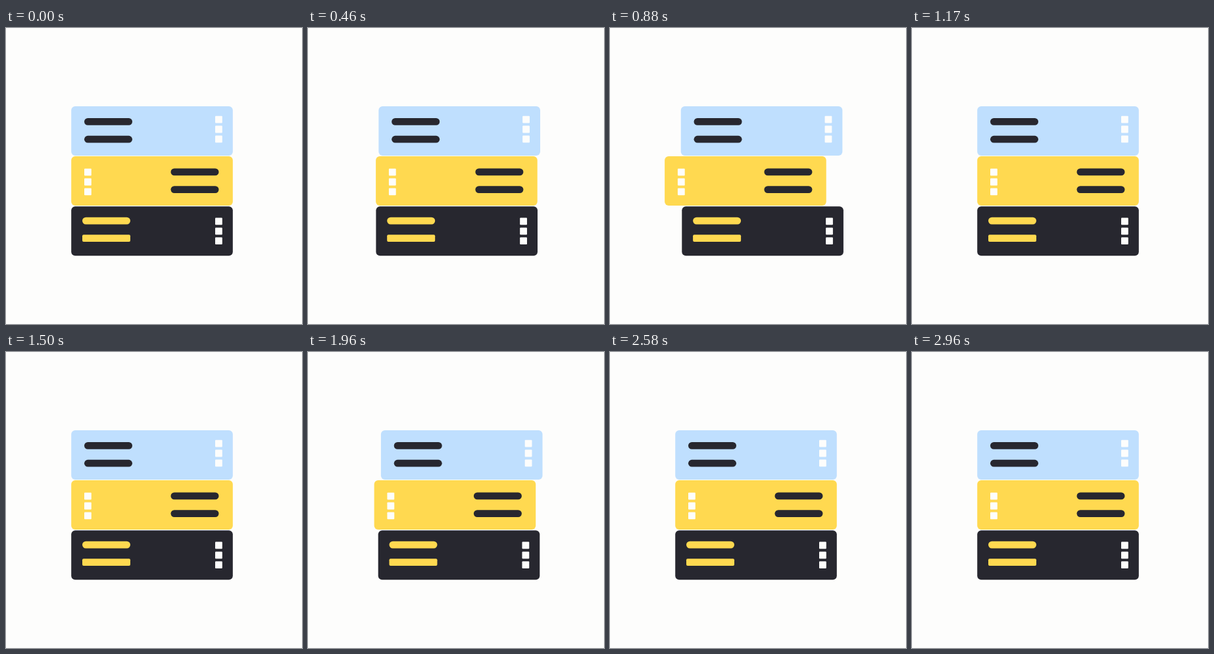
An HTML page that plays this animation: 450x450 px, repeating every 3 s.

```html
<!DOCTYPE html>
<html>
<head>
<meta charset="utf-8">
<style>
  html, body { margin: 0; width: 100%; height: 100%; overflow: hidden; background: #fdfdfc; }
  svg { display: block; width: 100vw; height: 100vh; }
</style>
</head>
<body>
<svg viewBox="0 0 450 450"></svg>
<script>
const LOOP = 3000, FRAME = 1000 / 24, CYCLE_FRAMES = 35;
const BLUE = '#bfdffe', YELLOW = '#ffd950', DARK = '#27272f', WHITE = '#fdfdfc';

// Keys are [time in ms, horizontal offset] within one sway.
const slabs = [
  { y: 119, fill: BLUE, ink: DARK, lineX: 119, lineY: [137, 163.8], dotX: 318, dotY: 133.7,
    keys: [[255, 0], [660, 16.2], [1100, 0]] },
  { y: 195, fill: YELLOW, ink: DARK, lineX: 250.5, lineY: [213.5, 240.2], dotX: 119, dotY: 213.7,
    keys: [[180, 0], [390, 5], [750, -19.5], [1130, 0]] },
  { y: 271.3, fill: DARK, ink: YELLOW, lineX: 116, lineY: [287.7, 314.3], dotX: 318, dotY: 288.5,
    keys: [[300, 0], [700, 15], [1115, 0]] }
];

const rect = (x, y, w, h, r, fill) =>
  `<rect x="${x}" y="${y}" width="${w}" height="${h}" rx="${r}" fill="${fill}"/>`;

const slab = s => '<g>' +
  rect(99.2, s.y, 245.6, 75, 6, s.fill) +
  s.lineY.map((y, i) =>
    rect(s.lineX, y, 73, 10.8, s.fill === DARK && i ? 2 : 5.4, s.ink)).join('') +
  [0, 1, 2].map(i => rect(s.dotX, s.dotY + i * 14.9, 10.8, 10.8, 1, WHITE)).join('') +
  '</g>';

const svg = document.querySelector('svg');
svg.innerHTML = slabs.map(slab).join('');

const ease = x => x < .5 ? .5 * (2 * x) ** 2.5 : 1 - .5 * (2 - 2 * x) ** 2.5;

function offset(keys, t) {
  const i = keys.findIndex(k => t < k[0]);
  if (i < 1) return 0;
  const [t0, a] = keys[i - 1], [t1, b] = keys[i];
  return a + (b - a) * ease((t - t0) / (t1 - t0));
}

function draw() {
  const frame = Math.floor((performance.now() % LOOP + 5) / FRAME);
  const t = frame % CYCLE_FRAMES * FRAME;
  slabs.forEach((s, i) =>
    svg.children[i].setAttribute('transform', `translate(${offset(s.keys, t)})`));
  requestAnimationFrame(draw);
}
draw();
</script>
</body>
</html>
```
